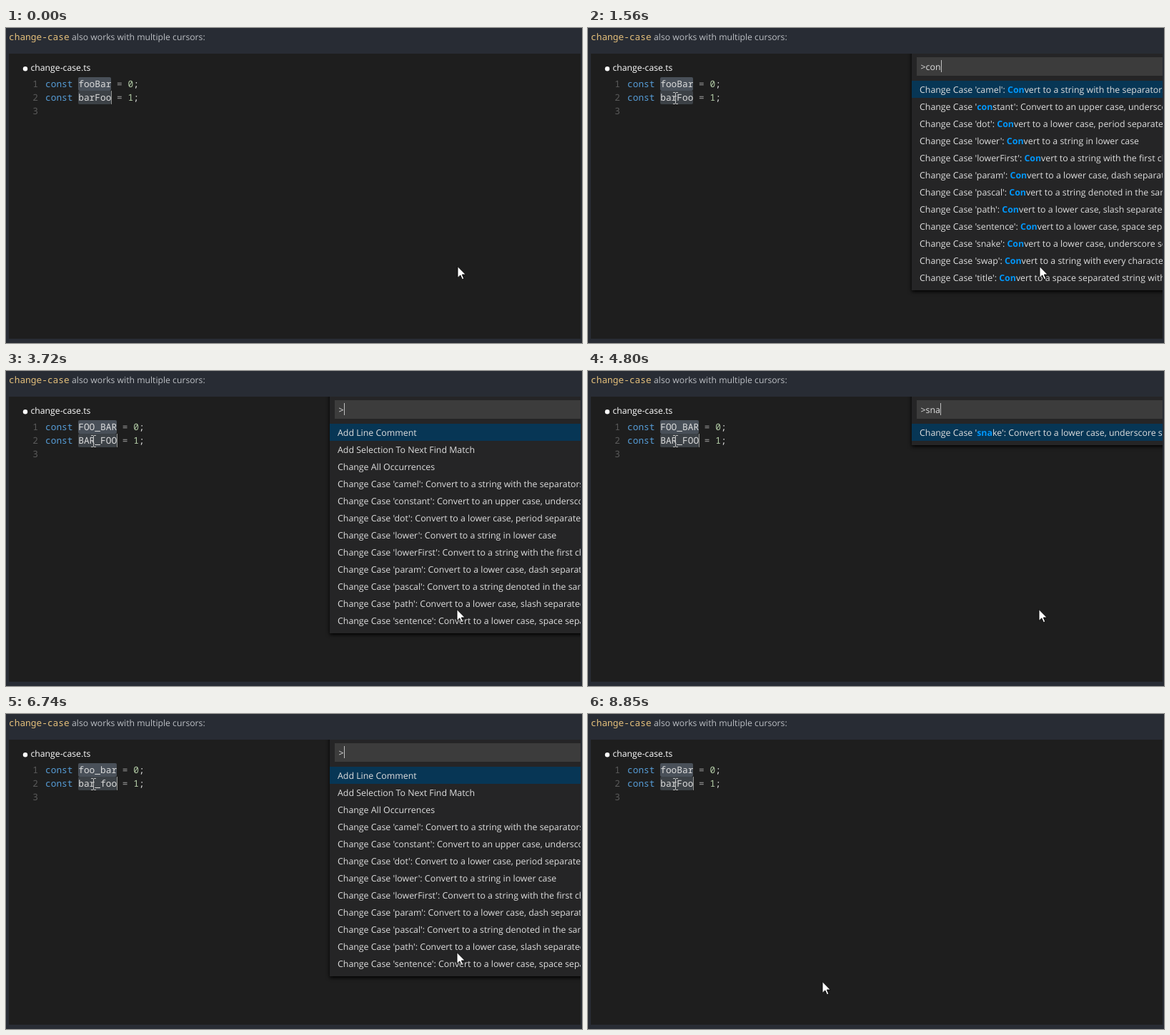
An HTML page with a canvas that plays this animation: 806 px wide and 442 px high, repeating every 9150 ms.

```html
<!DOCTYPE html>
<html lang="en">
<head>
<meta charset="utf-8">
<title>change-case</title>
<style>
html, body { margin: 0; width: 100%; height: 100%; overflow: hidden; background: #282c34; }
canvas { display: block; width: 806px; height: 442px; }
</style>
</head>
<body>
<canvas id="stage"></canvas>
<script>
const W = 806, H = 442, LOOP = 9150;
const canvas = document.getElementById('stage');
const ctx = canvas.getContext('2d');
const dpr = window.devicePixelRatio || 1;
canvas.width = W * dpr;
canvas.height = H * dpr;
ctx.scale(dpr, dpr);
ctx.textRendering = 'geometricPrecision';

const SANS = '"Open Sans", "Noto Sans", sans-serif';
const MONO = '12.83px "Noto Sans Mono", "DejaVu Sans Mono", monospace';
const UI = '12.36px ' + SANS;
const LABEL = '12.22px ' + SANS;
const UI_COLOR = '#dedede';
const CHAR = 7.7, CODE_X = 55, LINE_H = 19, ROW_H = 24, MAX_ROWS = 12;

const cases = [
  ['camel', 'a string with the separators denoted by having the next letter capitalised'],
  ['constant', 'an upper case, underscore separated string'],
  ['dot', 'a lower case, period separated string'],
  ['lower', 'a string in lower case'],
  ['lowerFirst', 'a string with the first character lower cased'],
  ['param', 'a lower case, dash separated string'],
  ['pascal', 'a string denoted in the same fashion as camelCase'],
  ['path', 'a lower case, slash separated string'],
  ['sentence', 'a lower case, space separated string'],
  ['snake', 'a lower case, underscore separated string'],
  ['swap', 'a string with every character case reversed'],
  ['title', 'a space separated string with the first character of every word upper cased']
];
const commands = [
  'Add Line Comment',
  'Add Selection To Next Find Match',
  'Change All Occurrences',
  ...cases.map(([name, text]) => `Change Case '${name}': Convert to ${text}`),
  'Insert Snippet',
  'Preferences: Open User Snippets',
  'Show Snippet Suggestions',
  'Surround With Snippet',
  'View: Debug Console'
];

// Each entry patches the state from its time on; query null means the palette is closed.
const timeline = [
  [0, { names: ['fooBar', 'barFoo'], caret: true, beam: null, mouse: [631, 334], query: null, blink: true }],
  [910, { beam: [179, 60] }],
  [990, { beam: [122, 98] }],
  [1140, { query: '', caret: false }],
  [1560, { query: 'con' }],
  [1710, { query: 'cons' }],
  [1860, { query: 'const' }],
  [2410, { blink: false }],
  [2630, { query: null, caret: true, names: ['FOO_BAR', 'BAR_FOO'] }],
  [3320, { mouse: [630, 334] }],
  [3720, { query: '', blink: true }],
  [4420, { blink: false }],
  [4650, { query: 'sn', blink: true }],
  [4800, { query: 'sna' }],
  [4880, { query: 'snak' }],
  [5030, { query: 'snake' }],
  [5580, { blink: false }],
  [5730, { query: null, names: ['foo_bar', 'bar_foo'] }],
  [6740, { query: '', blink: true }],
  [7290, { query: 'c', mouse: [500, 350] }],
  [7370, { mouse: [330, 372] }],
  [7440, { query: 'ca', mouse: [207, 386] }],
  [7520, { mouse: [214, 382] }],
  [7600, { query: 'cam', mouse: [223, 378] }],
  [7750, { query: 'came' }],
  [7900, { query: 'camel', mouse: [224, 378] }],
  [7990, { mouse: [226, 378] }],
  [8300, { blink: false }],
  [8530, { query: null, names: ['fooBar', 'barFoo'] }],
  [8700, { mouse: [256, 378] }],
  [8780, { mouse: [306, 377] }],
  [8850, { mouse: [327, 375] }]
];

function stateAt(t) {
  return Object.assign({}, ...timeline.filter(([start]) => start <= t).map(([, patch]) => patch));
}

function box(x, y, w, h, color) {
  ctx.fillStyle = color;
  ctx.fillRect(x, y, w, h);
}

// Returns the x where the text ends.
function write(text, x, y, font, color) {
  ctx.font = font;
  ctx.fillStyle = color;
  ctx.fillText(text, x, y);
  return x + ctx.measureText(text).width;
}

function drawPage() {
  box(0, 0, W, H, '#282c34');
  box(4, 36, 800, 400, '#1e1e1e');
  write('change-case', 4, 17, MONO, '#e5c07b');
  write('also works with multiple cursors:', 92, 17, LABEL, '#bbbec3');
  ctx.fillStyle = '#fff';
  ctx.beginPath();
  ctx.arc(27, 57.3, 3.2, 0, Math.PI * 2);
  ctx.fill();
  write('change-case.ts', 34.5, 60, LABEL, '#fff');
}

function drawCode({ names, caret }) {
  const nameX = CODE_X + 6 * CHAR;
  for (let i = 0; i < 3; i++) {
    write(String(i + 1), 37.3, 83 + i * LINE_H, MONO, '#5a5a5a');
  }
  names.forEach((name, i) => {
    const y = 83 + i * LINE_H;
    const endX = nameX + name.length * CHAR;
    ctx.fillStyle = i ? '#3c4146' : '#495059';
    ctx.beginPath();
    ctx.roundRect(101, y - 14, Math.round(endX) - 101, LINE_H, 2);
    ctx.fill();
    write('const', CODE_X, y, MONO, '#569cd6');
    write(name, nameX, y, MONO, '#dcdcdc');
    write('=', endX + CHAR, y, MONO, '#a0a0a0');
    write(String(i), endX + 3 * CHAR, y, MONO, '#b5cea8');
    write(';', endX + 4 * CHAR, y, MONO, '#dcdcdc');
    if (caret && i === 1) box(Math.round(endX), y - 14, 1, LINE_H, '#959694');
  });
}

function drawRow(text, query, y) {
  const at = query ? text.toLowerCase().indexOf(query) : 0;
  const end = at + query.length;
  let x = write(text.slice(0, at), 464, y, UI, UI_COLOR);
  x = write(text.slice(at, end), x, y, 'bold ' + UI, '#0097fb');
  write(text.slice(end), x, y, UI, UI_COLOR);
}

function drawPalette({ query, blink }) {
  if (query === null) return;
  const rows = commands.filter(c => c.toLowerCase().includes(query)).slice(0, MAX_ROWS);
  ctx.save();
  ctx.beginPath();
  ctx.rect(4, 36, 800, 400);
  ctx.clip();
  ctx.save();
  ctx.shadowColor = '#000';
  ctx.shadowBlur = 5 * dpr;
  ctx.shadowOffsetY = 2 * dpr;
  box(453, 30, 360, 50 + rows.length * ROW_H, '#252526');
  ctx.restore();
  box(460, 41, 344, 26, '#3c3c3c');
  const caretX = write('>' + query, 465.5, 59, UI, UI_COLOR);
  if (blink) box(Math.round(caretX), 45, 1, 17, '#c0c0c0');
  box(453, 74, 351, ROW_H, '#073655');
  rows.forEach((text, i) => drawRow(text, query, 91 + i * ROW_H));
  ctx.restore();
}

function drawBeam([x, y]) {
  const color = '#c4c4c4';
  box(x, y - 7, 1, 15, color);
  for (const edge of [y - 8, y + 8]) {
    box(x - 3, edge, 3, 1, color);
    box(x + 1, edge, 3, 1, color);
  }
}

function drawMouse([x, y]) {
  ctx.save();
  ctx.translate(x + 1, y + 0.5);
  const arrow = new Path2D('M0 0V16L3.8 12.4L6.4 18.2L8.8 17.2L6.3 11.5H11.3Z');
  ctx.fillStyle = '#fff';
  ctx.fill(arrow);
  ctx.strokeStyle = '#000';
  ctx.lineWidth = 0.9;
  ctx.stroke(arrow);
  ctx.restore();
}

function frame() {
  const state = stateAt(performance.now() % LOOP);
  drawPage();
  drawCode(state);
  if (state.beam) drawBeam(state.beam);
  drawPalette(state);
  drawMouse(state.mouse);
  requestAnimationFrame(frame);
}
frame();
</script>
</body>
</html>
```
